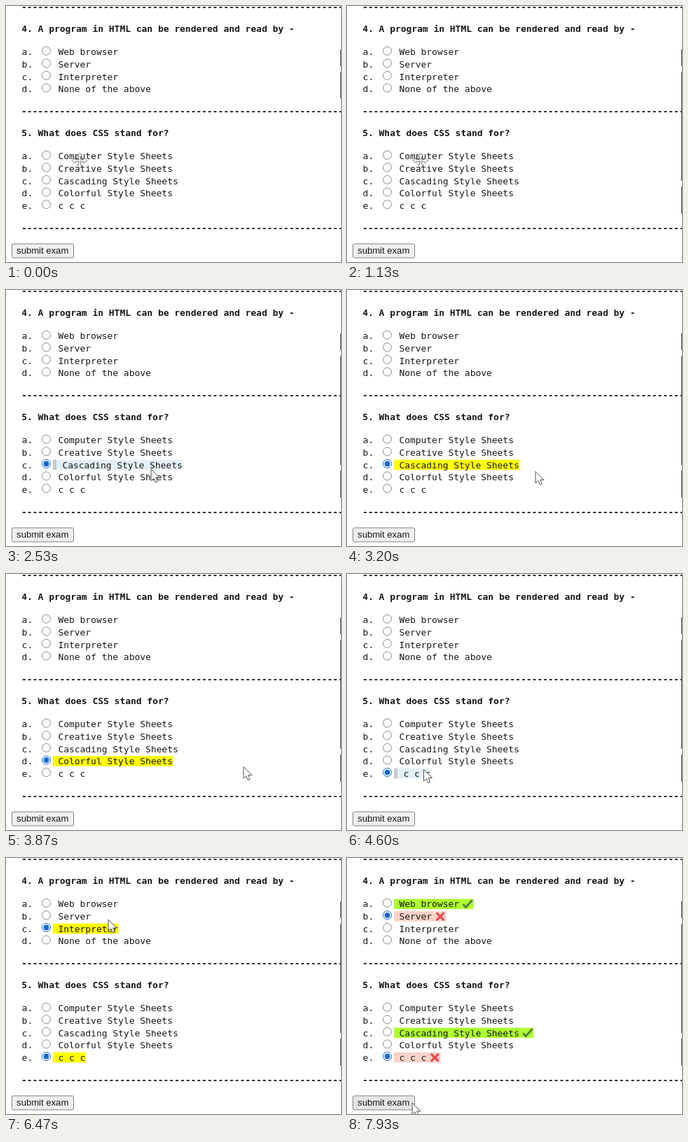
An HTML page for the animation above (8000 ms loop, 478 px wide and 366 px high).

```html
<!DOCTYPE html>
<html lang="en">
<head>
<meta charset="utf-8">
<title>Exam</title>
<style>
  html, body { margin: 0; width: 100%; height: 100%; overflow: hidden; background: #fff; }
  svg { display: block; }
  text { font: 12.94px "DejaVu Sans Mono", monospace; fill: #161616; }
  .bold { font-weight: bold; }
  .btn { font: 13.1px "Liberation Sans", Arial, sans-serif; text-anchor: middle; }
  .ring { fill: #fff; stroke: #8a8a8a; }
  .ring.on { stroke: #1467cf; }
  .dot { fill: #1467cf; }
  .bar { fill: #c6c9ca; }
  .edge { fill: #444; }
  .mark { fill: none; stroke-width: 3; stroke-linecap: round; stroke-linejoin: round; }
</style>
</head>
<body>
<svg id="stage" width="478" height="366" viewBox="0 0 478 366"></svg>
<script>
const LOOP = 8000, WAKE = 1270, SUBMIT = 7450;
const CHAR = 7.79, LEFT = 67, PITCH = 17.6, INDENT = 6, MARK = 20;
const svg = document.getElementById('stage');

const quiz = [
  { title: '4. A program in HTML can be rendered and read by -', y: 33, right: 0,
    options: ['Web browser', 'Server', 'Interpreter', 'None of the above'] },
  { title: '5. What does CSS stand for?', y: 182, right: 2,
    options: ['Computer Style Sheets', 'Creative Style Sheets', 'Cascading Style Sheets',
              'Colorful Style Sheets', 'c c c'] }
];
const rowY = (q, o) => quiz[q].y + 33 + o * PITCH;

// The pointer eases between stops; a pick also clicks an option.
const rest = (t, x, y) => ({ t, x, y });
const pick = (t, q, o) => ({ t, x: 98, y: rowY(q, o), q, o });
const stops = [
  rest(WAKE, 104, 215), pick(1480, 1, 0),
  rest(1870, 78, 233), pick(2260, 1, 2),
  rest(2800, 315, 262), rest(3200, 269, 259.5), pick(3470, 1, 3),
  rest(4000, 381, 277), pick(4480, 1, 4),
  rest(4600, 109.5, 279.5), pick(5040, 0, 3),
  rest(5470, 297, 132.5), rest(5700, 334, 122), pick(6100, 0, 2),
  rest(6470, 146, 88), pick(6690, 0, 1),
  rest(7300, 70, 347), rest(SUBMIT, 71, 348), rest(7900, 93, 350)
];

function add(tag, attrs, parent = svg, content = '') {
  const el = document.createElementNS('http://www.w3.org/2000/svg', tag);
  set(el, attrs);
  el.textContent = content;
  return parent.appendChild(el);
}
function set(el, attrs) {
  for (const k in attrs) el.setAttribute(k, attrs[k]);
}
function show(el, on) {
  set(el, { visibility: on ? 'visible' : 'hidden' });
}
function write(x, y, content, cls = '') {
  return add('text', { x, y: y + 4.4, class: cls }, svg, content);
}
function edge(y, height) {
  return add('rect', { x: 477, y, width: 1, height, class: 'edge' });
}

function addRow(label, q, o) {
  const y = rowY(q, o), width = (label.length + 1) * CHAR;
  const correct = o === quiz[q].right;
  const box = { x: LEFT, y: y - 7.5, height: 14.5 };
  const dial = { cx: 57.5, cy: y - 1.8 };
  write(22.6, y, 'abcde'[o] + '.');
  return {
    q, o, y, width, correct,
    back: add('rect', box),
    bar: add('rect', { ...box, width: 5, class: 'bar' }),
    ring: add('circle', { ...dial, r: 6 }),
    dot: add('circle', { ...dial, r: 3.9, class: 'dot' }),
    text: write(LEFT, y, label),
    mark: add('path', {
      class: 'mark',
      transform: `translate(${LEFT + width + MARK / 2 + 1.5} ${y})`,
      d: correct ? 'M-5.5 1L-2.5 4.5L6 -5' : 'M-4.5 -4.5L4.5 4.5M4.5 -4.5L-4.5 4.5',
      stroke: correct ? '#5c7f45' : '#e5484d'
    })
  };
}

for (const y of [2, 150.6, 317.3]) write(22, y, '-'.repeat(60), 'bold');
edge(62, 24);
edge(94, 38);
const lateEdges = [edge(132, 118), edge(258, 39)];

const button = add('rect', { x: 8.5, y: 340, width: 88, height: 20, rx: 2, stroke: '#808080' });
write(52.2, 349.2, 'submit exam', 'btn');

const rows = quiz.flatMap((item, q) => {
  write(22.2, item.y, item.title, 'bold');
  return item.options.map((label, o) => addRow(label, q, o));
});

// Four-way pan pointer, then the arrow
const pan = add('g', { transform: 'translate(105 221)', fill: '#fff', stroke: '#777', opacity: 0.85 });
for (let a = 0; a < 360; a += 90) {
  add('path', { d: 'M0 -11L4 -6H1.5V-2H-1.5V-6H-4Z', transform: `rotate(${a})` }, pan);
}
const arrow = add('path', {
  d: 'M0 0V16.5L3.8 13L6.5 19L9.2 17.8L6.6 12H12Z',
  fill: '#fff', stroke: '#505050', 'stroke-linejoin': 'round'
});

function pointer(t) {
  const i = stops.findIndex(s => s.t > t);
  if (i < 1) return stops.at(i);
  const a = stops[i - 1], b = stops[i];
  const u = (t - a.t) / (b.t - a.t), e = u * u * (3 - 2 * u);
  return { x: a.x + (b.x - a.x) * e, y: a.y + (b.y - a.y) * e };
}

function rowFill(hover, marked, correct, checked) {
  if (hover) return '#e3f1f6';
  if (marked) return correct ? '#adff2f' : '#f9d2c8';
  return checked ? '#ff0' : 'none';
}

function draw(t) {
  const awake = t >= WAKE, p = pointer(t);
  const chosen = [];
  for (const s of stops) if (s.t <= t && 'q' in s) chosen[s.q] = s.o;

  for (const r of rows) {
    const checked = chosen[r.q] === r.o;
    const hover = awake && p.x >= LEFT && p.x <= LEFT + r.width && Math.abs(p.y - r.y) < 8;
    const marked = t >= SUBMIT && (r.correct || checked);
    const shift = hover ? INDENT : 0;
    set(r.back, {
      fill: rowFill(hover, marked, r.correct, checked),
      width: r.width + shift + (marked ? MARK : 0)
    });
    set(r.text, { x: LEFT + CHAR + shift - 0.4 });
    set(r.ring, { class: checked ? 'ring on' : 'ring' });
    show(r.bar, hover);
    show(r.dot, checked);
    show(r.mark, marked);
  }

  const over = awake && p.x < 97 && p.y > 340;
  set(button, { fill: over ? '#e5e5e5' : '#efefef' });
  lateEdges.forEach(e => show(e, t >= 70));
  show(pan, !awake);
  show(arrow, awake);
  set(arrow, { transform: `translate(${p.x} ${p.y})` });
}

function tick() {
  draw(performance.now() % LOOP);
  requestAnimationFrame(tick);
}
tick();
</script>
</body>
</html>
```
